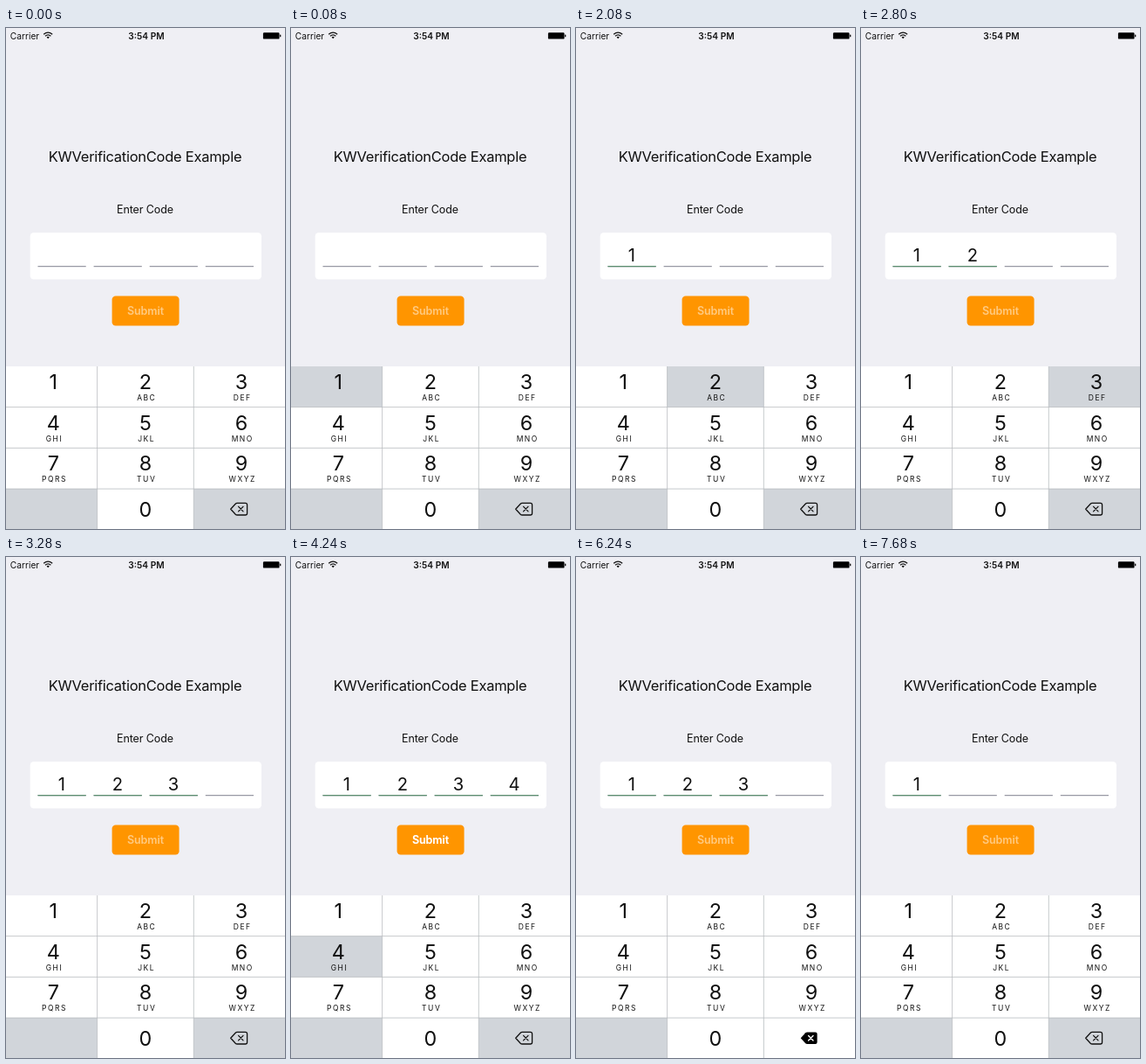
Animation of 320 by 573 pixels, one loop 8 s. Source, as an HTML page:

```html
<!DOCTYPE html>
<html lang="en">
<head>
<meta charset="utf-8">
<title>Verification code</title>
<style>
  html, body { margin: 0; width: 100%; height: 100%; overflow: hidden; background: #efeff4; }
  svg { display: block; width: 320px; height: 573px; font-family: Inter, Roboto, sans-serif; fill: #111; }
  text { text-anchor: middle; }
  .title { font-size: 16.5px; letter-spacing: -.27px; }
  .label { font-size: 12.5px; letter-spacing: -.1px; }
  .submit { font-size: 12.5px; font-weight: 600; letter-spacing: -.1px; fill: #fff; }
  .status { font-size: 10.2px; }
  .clock { font-weight: 600; }
  .digit { font-size: 20.2px; }
  .num { font-size: 23.4px; }
  .abc { font-size: 8.5px; letter-spacing: 1.5px; }
  .rule { stroke: #9899a4; stroke-width: 1.4; }
  .rule.done { stroke: #5c8f70; }
  .grid { stroke: #b9bdc1; stroke-width: .8; }
  .gray { fill: #d1d5da; }
  .white { fill: #fff; }

  /* Everything switches hard; 1% is 80 ms. */
  .anim { opacity: 0; animation: 8s step-end infinite; }
  #code1 { animation-name: code1; }
  #code2 { animation-name: code2; }
  #code3 { animation-name: code3; }
  #code4, #enabled { animation-name: code4; }
  #key1 { animation-name: key1; }
  #key2 { animation-name: key2; }
  #key3 { animation-name: key3; }
  #key4 { animation-name: key4; }
  #erase { animation-name: erase; }
  @keyframes code1 { 0% { opacity: 0 } 22%, 100% { opacity: 1 } }
  @keyframes code2 { 0%, 96%, 100% { opacity: 0 } 31% { opacity: 1 } }
  @keyframes code3 { 0%, 80%, 100% { opacity: 0 } 41% { opacity: 1 } }
  @keyframes code4 { 0%, 55%, 100% { opacity: 0 } 53% { opacity: 1 } }
  @keyframes key1 { 0%, 22%, 100% { opacity: 0 } 1% { opacity: 1 } }
  @keyframes key2 { 0%, 31%, 100% { opacity: 0 } 26% { opacity: 1 } }
  @keyframes key3 { 0%, 41%, 100% { opacity: 0 } 35% { opacity: 1 } }
  @keyframes key4 { 0%, 54%, 100% { opacity: 0 } 45% { opacity: 1 } }
  @keyframes erase { 0%, 79%, 81%, 100% { opacity: 0 } 55%, 80% { opacity: 1 } }
</style>
</head>
<body>
<svg viewBox="0 0 320 573">
  <rect width="320" height="573" fill="#efeff4"/>

  <text class="status" x="21.5" y="12.6">Carrier</text>
  <g fill="none" stroke="#111" stroke-width="1.3">
    <path d="M43.2 7.3Q48.2 3 53.2 7.3M45 9.3Q48.2 6.5 51.4 9.3"/>
    <path d="M46.6 10.5Q48.2 9.2 49.8 10.5L48.2 12.2Z" fill="#111" stroke="none"/>
  </g>
  <text class="status clock" x="161" y="12.6">3:54 PM</text>
  <rect x="294.9" y="5.2" width="18.6" height="7.4" rx="1.2" fill="#000"/>
  <rect x="314.1" y="7.5" width="1.2" height="2.8" rx=".5" fill="#000"/>

  <text class="title" x="159.5" y="152.6">KWVerificationCode Example</text>
  <text class="label" x="159.5" y="212.4">Enter Code</text>

  <rect class="white" x="27.7" y="234" width="265.3" height="53.6" rx="4.2"/>
  <g id="cells"></g>

  <rect x="121.6" y="306.4" width="77" height="34.2" rx="4.2" fill="#ff9500"/>
  <text class="submit" x="160" y="328.3" fill-opacity=".5">Submit</text>
  <text class="submit anim" id="enabled" x="160" y="328.3">Submit</text>

  <rect class="white" y="387" width="320" height="186"/>
  <rect class="gray" y="527" width="104.5" height="46"/>
  <rect class="gray" x="215.3" y="527" width="104.7" height="46"/>
  <g id="presses"></g>
  <g id="keys"></g>

  <g fill="none" stroke="#111" stroke-width="1.3" stroke-linecap="round" stroke-linejoin="round">
    <path id="tag" d="M257.7 550.2L263.2 544.2Q264 543.4 265.1 543.4H274.6Q276.6 543.4 276.6 545.4V555Q276.6 557 274.6 557H265.1Q264 557 263.2 556.2Z"/>
    <path id="cross" d="M266.6 547.4L272 552.9M272 547.4L266.6 552.9"/>
  </g>
  <g class="anim" id="erase">
    <rect class="white" x="215.3" y="527" width="104.7" height="46"/>
    <use href="#tag" fill="#000"/>
    <use href="#cross" stroke="#fff" stroke-width="1.4" stroke-linecap="round"/>
  </g>
  <path class="grid" d="M104.6 387V573M215.3 387V573M0 433.6H320M0 480.4H320M0 527.1H320"/>
</svg>
<script>
  const fill = (id, html) => { document.getElementById(id).innerHTML = html; };
  const columns = [0, 104.6, 215.3, 320];
  const centers = [54.3, 160, 270];
  const rowHeight = 46.7;
  const letters = ['', 'ABC', 'DEF', 'GHI', 'JKL', 'MNO', 'PQRS', 'TUV', 'WXYZ'];

  const cell = n => {
    const x = 64.1 * n;
    const rule = `x1="${x - 27.6}" x2="${x + 27.6}" y1="272.6" y2="272.6"`;
    return `<line class="rule" ${rule}/>
      <g class="anim" id="code${n}">
        <line class="rule done" ${rule}/>
        <text class="digit" x="${x - .3}" y="267">${n}</text>
      </g>`;
  };

  const press = n => {
    const col = (n - 1) % 3, row = Math.floor((n - 1) / 3);
    return `<rect class="gray anim" id="key${n}" x="${columns[col]}" y="${387 + row * rowHeight}"
      width="${columns[col + 1] - columns[col]}" height="${rowHeight}"/>`;
  };

  const key = (text, i) => {
    const x = centers[i % 3], y = 413 + Math.floor(i / 3) * rowHeight;
    return `<text class="num" x="${x}" y="${y}">${i + 1}</text>
      <text class="abc" x="${x + 1.2}" y="${y + 12.9}">${text}</text>`;
  };

  fill('cells', [1, 2, 3, 4].map(cell).join(''));
  fill('presses', [1, 2, 3, 4].map(press).join(''));
  fill('keys', letters.map(key).join('') + '<text class="num" x="160" y="558.6">0</text>');
</script>
</body>
</html>
```
